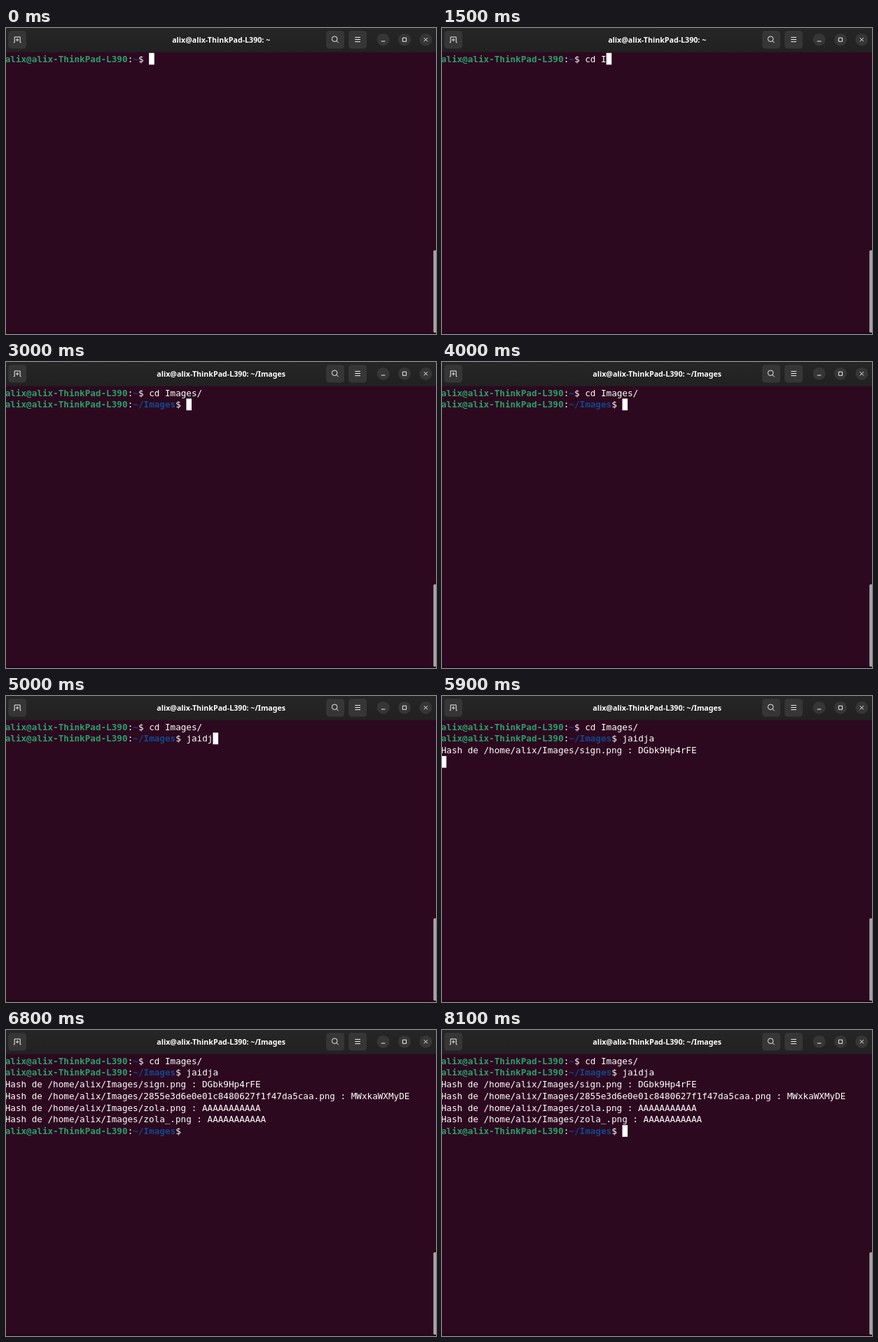
An HTML page for the animation above (8.8 s loop, 614 by 438 pixels).

```html
<!DOCTYPE html>
<html lang="fr">
<head>
<meta charset="utf-8">
<title>Terminal</title>
<style>
  html, body { margin: 0; width: 100%; height: 100%; overflow: hidden; background: #2d0920; }
  svg { display: block; }
  text { white-space: pre; }
  .term { font: 12.64px "DejaVu Sans Mono", monospace; fill: #fff; }
  .user { fill: #26a269; font-weight: 700; }
  .path { fill: #12488b; font-weight: 700; }
  .title { font: 700 10.65px "Noto Sans", "Open Sans", sans-serif; fill: #fff; text-anchor: middle; }
  .icon { fill: none; stroke: #f0f0f0; stroke-width: 1; }
</style>
</head>
<body>
<svg width="614" height="438" viewBox="0 0 614 438">
  <defs>
    <linearGradient id="bar" x2="0" y2="1">
      <stop offset="0" stop-color="#262626"/>
      <stop offset="1" stop-color="#212121"/>
    </linearGradient>
  </defs>
  <rect width="614" height="438" fill="#2d0920"/>
  <rect y="435.5" width="614" height="2.5" fill="#22061a"/>
  <rect x="610.3" y="318.3" width="5" height="117.7" rx="1.5" fill="#aaa5a8"/>
  <rect width="614" height="34.6" fill="url(#bar)"/>
  <g fill="#363636">
    <rect x="3.2" y="4" width="25.9" height="25.6" rx="4.5"/>
    <rect x="457.2" y="4" width="25.9" height="25.6" rx="4.5"/>
    <rect x="489.2" y="4" width="25.9" height="25.6" rx="4.5"/>
    <circle cx="538.6" cy="16.7" r="9"/>
    <circle cx="569" cy="16.7" r="9"/>
    <circle cx="599.4" cy="16.7" r="9"/>
  </g>
  <g class="icon">
    <path d="M10.8 20.7H12.2V12.9H20.2V20.7H21.6M16.2 14.8V19.2M14 17H18.4"/>
    <circle cx="469.2" cy="15.7" r="3.8"/>
    <path d="M471.9 18.4L474.7 21.2"/>
    <path d="M498.3 13.4H506M498.3 16.5H506M498.3 19.6H506"/>
    <path d="M535.8 19H541.4"/>
    <path d="M566.4 14.1H571.6V19.3H566.4Z"/>
    <path d="M596.8 14.1L602 19.3M602 14.1L596.8 19.3"/>
  </g>
  <text id="title" class="title" x="307.2" y="20.6"></text>
  <rect id="cursor" width="7.6" height="16.74" fill="#fff"/>
  <g id="screen" class="term"></g>
</svg>
<script>
const NS = 'http://www.w3.org/2000/svg';
const LOOP = 8800, CELL = 7.61, LINE = 16.74, LEFT = -1.3, TOP = 35.7, BASE = 13;
const HOST = 'alix@alix-ThinkPad-L390';
const DIR = '/home/alix/Images/';
const title = document.getElementById('title');
const cursor = document.getElementById('cursor');
const screen = document.getElementById('screen');

// [time, text so far]
const typedCd = [[0, ''], [1000, 'c'], [1100, 'cd'], [1200, 'cd '], [1500, 'cd I'],
  [1700, 'cd Im'], [2000, 'cd Images/']];
const typedRun = [[0, ''], [4200, 'j'], [4500, 'ja'], [4600, 'jai'], [4800, 'jaid'],
  [5000, 'jaidj'], [5300, 'jaidja']];
const hashes = [
  [5900, 'sign.png', 'DGbk9Hp4rFE'],
  [6000, '2855e3d6e0e01c8480627f1f47da5caa.png', 'MWxkaWXMyDE'],
  [6200, 'zola.png', 'AAAAAAAAAAA'],
  [6400, 'zola_.png', 'AAAAAAAAAAA']
];
const ENTER_CD = 2700, ENTER_RUN = 5700, DONE = 6500;
const hidden = [[400, 1000], [2600, 2700], [3300, 4000], [6300, 6900], [7500, 8100]];

const latest = (steps, t) => steps.filter(s => s[0] <= t).pop()[1];
const prompt = (path, cmd) => [[HOST, 'user'], [':', ''], [path, 'path'], ['$ ' + cmd, '']];

function linesAt(t) {
  const lines = [prompt('~', latest(typedCd, t))];
  if (t >= ENTER_CD) lines.push(prompt('~/Images', latest(typedRun, t)));
  if (t >= ENTER_RUN) {
    for (const [at, file, hash] of hashes)
      if (t >= at) lines.push([[`Hash de ${DIR}${file} : ${hash}`, '']]);
    lines.push(t >= DONE ? prompt('~/Images', '') : []);
  }
  return lines;
}

function drawLine(parts, row) {
  const text = document.createElementNS(NS, 'text');
  text.setAttribute('y', TOP + row * LINE + BASE);
  let col = 0;
  for (const [str, cls] of parts) {
    const span = document.createElementNS(NS, 'tspan');
    span.setAttribute('x', LEFT + col * CELL);
    span.setAttribute('class', cls);
    span.textContent = str;
    text.appendChild(span);
    col += str.length;
  }
  screen.appendChild(text);
  return col;
}

let shown = '';
function render(t) {
  const lines = linesAt(t);
  const key = JSON.stringify(lines);
  if (key !== shown) {
    shown = key;
    screen.textContent = '';
    let col = 0;
    lines.forEach((parts, row) => { col = drawLine(parts, row); });
    cursor.setAttribute('x', LEFT + col * CELL);
    cursor.setAttribute('y', TOP + (lines.length - 1) * LINE);
    title.textContent = HOST + (t < ENTER_CD ? ': ~' : ': ~/Images');
  }
  const off = hidden.some(([a, b]) => t >= a && t < b);
  cursor.setAttribute('visibility', off ? 'hidden' : 'visible');
}

const start = performance.now();
function tick() {
  render((performance.now() - start) % LOOP);
  requestAnimationFrame(tick);
}
tick();
</script>
</body>
</html>
```
